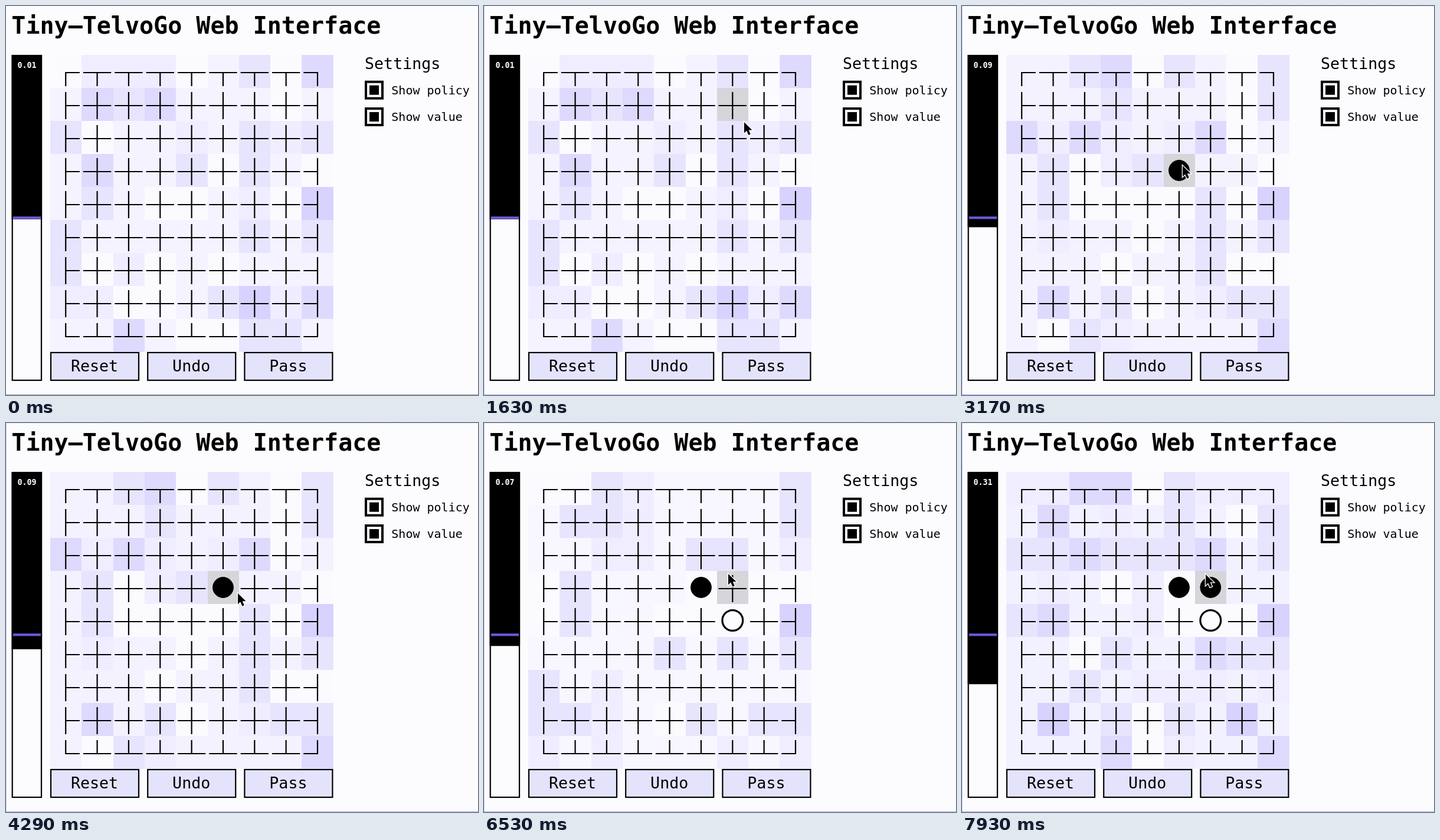
These frames come from a looping animation (800 by 660 pixels, 8000 ms). An HTML page:

```html
<!DOCTYPE html>
<html lang="en">
<head>
<meta charset="utf-8">
<title>Board interface</title>
<style>
  html, body { margin: 0; width: 100%; height: 100%; overflow: hidden; background: #fcfcff; }
  svg { display: block; font-family: "DejaVu Sans Mono", monospace; }
</style>
</head>
<body>
<svg id="stage" width="800" height="660" viewBox="0 0 800 660"></svg>
<script>
const LOOP = 8000, SIZE = 9;
const INK = '#000', PAPER = '#fcfcff', TINT = '#d7d2fe', HOVER = '#d5d5da';
const stage = document.getElementById('stage');

function add(tag, attrs, text) {
  const el = document.createElementNS('http://www.w3.org/2000/svg', tag);
  set(el, attrs);
  if (text) el.textContent = text;
  return stage.appendChild(el);
}
function set(el, attrs) {
  for (const name in attrs) el.setAttribute(name, attrs[name]);
}
const box = (x, y, width, height, fill, more) =>
  add('rect', { x, y, width, height, fill, ...more });
const label = (x, y, size, text, more) =>
  add('text', { x, y, 'font-size': size, fill: INK, ...more }, text);
const centred = { 'text-anchor': 'middle' };

// Policy strength per point, written as column letter and row from the top.
const SHADE = { max: 1, strong: .8, medium: .55, soft: .38, clear: .04 };
const phases = [
  { start: 0, value: .01, base: .23, stones: {},
    max: 'i5 g8', strong: 'i1 b2 d2 b4 c9 i8',
    medium: 'g1 c2 a3 g3 i3 e4 g4 b5 a6 g6 i6 a7 f8 g9 h9',
    soft: 'b1 c1 d1 e3 h3 g5 c7 a8 b8 h8',
    clear: 'a1 e1 h1 h2 b3 f4 i4 d5 e5 h5 b7 d7 f7 d8 c8 e9 f9' },
  { start: 2830, value: .09, base: .24, stones: { f4: INK },
    max: 'i5', strong: 'd1 a3 c3 g3 b8 i9',
    medium: 'c1 f1 i1 d2 i2 b4 e4 b5 g5 g6 i6 g7 d8 h8 i8 c9',
    soft: 'b3 d3 f3 d4 b6 g8 d9',
    clear: 'e1 h1 h2 h3 c4 i4 c5 d5 e5 f5 h5 e6 d7 h7 i7 e8 b9' },
  { start: 4800, value: .07, base: .11, stones: { f4: INK, g5: PAPER },
    max: 'i5', strong: '',
    medium: 'c1 i1 b2 c2 i2 f3 g3 b4 b5 e6 g6 i6 a7 a8 b8 f8 h8 i8',
    soft: 'd1 d2 c3 d3 i3 c7 c8 c9 g9 i9 a9',
    clear: 'a1 b1 a4 f4 h4 i4 a5 e5 f5 g5 h5 e8' },
  { start: 6950, value: .305, shown: '0.31', base: .28, stones: { f4: INK, g5: PAPER, g4: INK },
    max: 'i5 b8 h8', strong: 'c1 d1 b2 c3 g3 b5 g6 d9 i9',
    medium: 'f1 f2 i2 a3 b3 d3 e3 f3 i3 a5 d6 h6 i6 c7 d8 f8',
    soft: 'a1 b1 g1 h1 i1 d2 b4 e4 e5 e7 f7 g7 i7 f9',
    clear: 'e1 h2 d4 f4 f5 g5 h5 c6 e8 e9' }
];
for (const phase of phases) {
  phase.shades = {};
  for (const level in SHADE)
    for (const point of phase[level].split(' ')) phase.shades[point] = SHADE[level];
}

// Page text and controls
label(9.3, 47, 40, 'Tiny–TelvoGo Web Interface', { 'font-weight': 700 });
label(608, 107, 26.67, 'Settings');
['Show policy', 'Show value'].forEach((text, i) => {
  const y = 126.67 + 45.33 * i;
  box(608, y, 32, 32, INK);
  box(612, y + 4, 24, 24, PAPER);
  box(616, y + 8, 16, 16, INK);
  label(653.3, y + 23.3, 20, text);
});
['Reset', 'Undo', 'Pass'].forEach((text, i) => {
  const x = 75 + 164.2 * i;
  box(x + 1, 588, 149, 47, '#e3e3fc', { stroke: INK, 'stroke-width': 2.2 });
  label(x + 75, 620, 26.67, text, centred);
});

// Value bar
box(10.7, 84, 49.3, 551, PAPER, { stroke: INK, 'stroke-width': 2.2 });
const fill = box(9.6, 83, 51.5, 278, INK);
box(12, 357.2, 47, 4.2, '#6a5bdc');
const valueText = label(35.5, 104.5, 13.33, '0.01', { ...centred, 'font-weight': 700, fill: '#fff' });

// Board
const cells = [];
const cellX = c => Math.round(75 + 53.3 * c), cellY = r => Math.round(82.6 + 56 * r);
for (let r = 0; r < SIZE; r++) for (let c = 0; c < SIZE; c++) {
  const x = cellX(c), y = cellY(r);
  cells.push({
    c, r, point: 'abcdefghi'[c] + (r + 1),
    rect: box(x, y, cellX(c + 1) - x, cellY(r + 1) - y, TINT)
  });
}
for (const cell of cells) {
  const { c, r } = cell, x = 101.2 + 53.35 * c, y = 113 + 56 * r;
  const left = c ? x - 23.7 : x - 1, right = c < SIZE - 1 ? x + 23.7 : x + 1;
  const top = r ? y - 23 : y, bottom = r < SIZE - 1 ? y + 23 : y;
  cell.lines = add('path', {
    d: `M${left} ${y}H${right}M${x} ${top}V${bottom}`, stroke: INK, 'stroke-width': 2.2, fill: 'none'
  });
  cell.stone = add('circle', { cx: x, cy: y - 2, r: 17.4, stroke: INK });
}

// Window edge and pointer
const bottomEdge = box(0, 659, 800, 1, '#999');
const leftEdge = box(0, 0, 1, 660, '#cfcaff');
const topEdge = add('path', { d: 'M0 .5H800', stroke: '#d8d6ff', 'stroke-dasharray': '2 2' });
const pointer = add('path', {
  d: 'M0 0V18.5L4.2 14.6L7.4 21.8L10.8 20.3L7.7 13.3H13.5Z',
  fill: INK, stroke: '#fff', 'stroke-width': 2.6, 'paint-order': 'stroke'
});

// Pointer track: time, x, y
const track = [
  [150, 590, 660], [450, 440, 345], [650, 404, 326], [1200, 424, 160], [1630, 441, 197],
  [2350, 380, 268], [2700, 374, 271], [3400, 374, 271], [4290, 393, 289],
  [5000, 408, 285], [5900, 416, 262], [6530, 414, 256], [6800, 413, 257], [LOOP, 413, 257]
];
function pointerAt(t) {
  const i = track.findIndex(key => key[0] > t);
  if (i < 1) return null;
  const [t0, x0, y0] = track[i - 1], [t1, x1, y1] = track[i];
  const k = (t - t0) / (t1 - t0);
  return [x0 + (x1 - x0) * k, y0 + (y1 - y0) * k];
}

const ease = x => 1 - (1 - Math.min(1, x)) ** 2.3;

function draw(t) {
  const index = phases.findLastIndex(phase => t >= phase.start);
  const phase = phases[index], before = phases[Math.max(0, index - 1)];
  const value = before.value + (phase.value - before.value) * ease((t - phase.start) / 1000);
  set(fill, { height: 276 + 276 * value });
  valueText.textContent = phase.shown || phase.value.toFixed(2);

  // The hovered point trails the pointer slightly.
  const tip = pointerAt(t), hover = pointerAt(t - 60);
  const hoverC = hover ? Math.floor((hover[0] - 75) / 53.3) : -1;
  const hoverR = hover ? Math.floor((hover[1] - 82.6) / 56) : -1;
  for (const { c, r, point, rect, lines, stone } of cells) {
    const hovered = c === hoverC && r === hoverR;
    set(rect, {
      fill: hovered ? HOVER : TINT,
      opacity: hovered ? 1 : phase.shades[point] ?? phase.base
    });
    const colour = phase.stones[point];
    set(lines, { visibility: colour ? 'hidden' : 'visible' });
    set(stone, {
      visibility: colour ? 'visible' : 'hidden',
      fill: colour || 'none', 'stroke-width': colour === PAPER ? 3.2 : 1
    });
  }

  set(pointer, { visibility: tip ? 'visible' : 'hidden' });
  if (tip) set(pointer, { transform: `translate(${tip})` });
  set(bottomEdge, { fill: t < 150 ? '#999' : '#aaa5ee' });
  set(leftEdge, { visibility: t < 150 ? 'hidden' : 'visible', y: t < 890 ? 180 : 0 });
  set(topEdge, { visibility: t < 2570 ? 'hidden' : 'visible' });
}

const begin = performance.now();
function frame() {
  draw((performance.now() - begin) % LOOP);
  requestAnimationFrame(frame);
}
frame();
</script>
</body>
</html>
```
